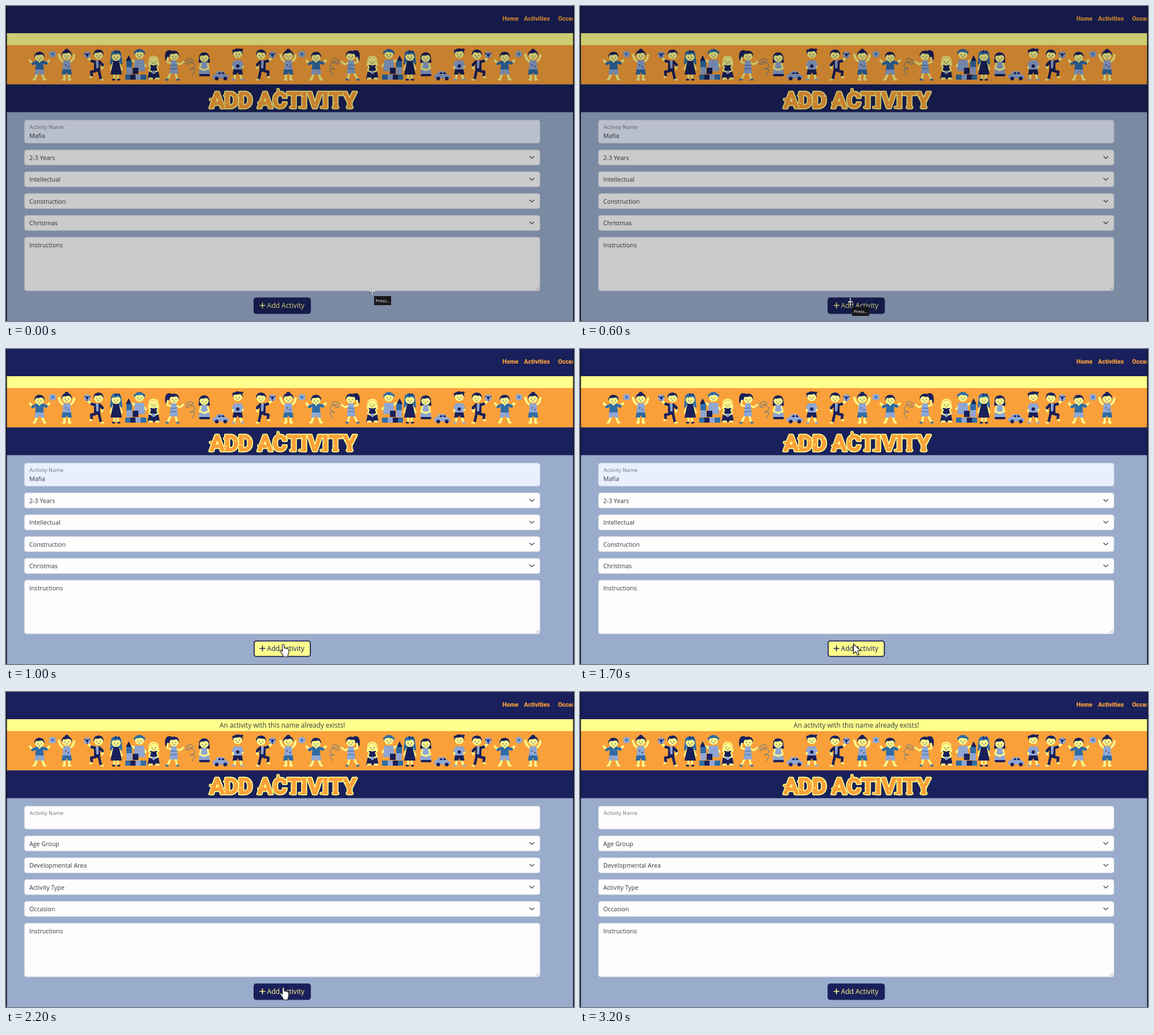
Animation of 1000 by 556 pixels, one loop 3500 ms. Source, as an HTML page:

```html
<!DOCTYPE html>
<html lang="en">
<head>
<meta charset="utf-8">
<title>Add Activity</title>
<style>
  html, body { margin: 0; width: 100%; height: 100%; overflow: hidden; background: #9aaccb; }
  svg { display: block; width: 100%; height: 100%; }
  text { font-family: "Open Sans", "Noto Sans", sans-serif; font-size: 10.7px; fill: #343a40; }
  .nav text { font: 800 10.6px Roboto, sans-serif; fill: #f9a03a; }
  .title text { font: 700 39px Roboto, sans-serif; fill: inherit; stroke-linejoin: round; }
  .field { fill: #fefdfe; stroke: #d3d9e4; stroke-width: .8; }
  .line { fill: none; stroke-linecap: round; stroke-linejoin: round; }
  #button text { font-size: 12.1px; }
</style>
</head>
<body>
<svg viewBox="0 0 1000 556" preserveAspectRatio="none">
  <rect width="1000" height="556" fill="#9aaccb"/>
  <rect width="1000" height="48" fill="#1a205b"/>
  <g class="nav">
    <text x="874" y="26">Home</text>
    <text x="912" y="26">Activities</text>
    <text x="972" y="26">Occasions</text>
  </g>
  <rect y="48" width="1000" height="21" fill="#ffff8d"/>
  <text id="message" x="486.5" y="63" text-anchor="middle" style="font-size:11.8px">An activity with this name already exists!</text>
  <g id="banner"><rect y="69" width="1000" height="69.500" fill="#f9a03a"/></g>
  <g id="page">
    <rect y="138.400" width="1000" height="49" fill="#1a205b"/>
    <g class="title" id="title"></g>
    <g id="form"></g>
    <g id="button">
      <rect x="436.8" y="515.3" width="99" height="27.4" rx="4" stroke="#1a205b" stroke-width="1.8"/>
      <path class="line" d="M451.500 524v9M447 528.500h9" stroke-width="1.6"/>
      <text x="459.500" y="532.700">Add Activity</text>
    </g>
  </g>
  <path d="M0 0h1.600v556H0zM998.400 0h1.600v556h-1.600z" fill="#101226"/>
  <rect id="dim" width="1000" height="556" opacity=".2"/>
  <g id="snip">
    <path d="M0-7V7M-4 0H4" stroke="#fff" stroke-width="1.400"/>
    <path d="M-1.200-7V7M1.200-7V7" stroke="#333" stroke-width=".4"/>
    <rect x="3" y="9" width="30" height="16" fill="#18181c"/>
    <text x="6" y="20" style="font-size:7.5px;fill:#fff">Press…</text>
  </g>
  <path id="arrow" d="M481.500 520.500v17l4-3.600 3 6.400 3-1.400-3-6.200h5.500z" fill="#fff" stroke="#111" stroke-width="1.100" stroke-linejoin="round"/>
  <path id="hand" d="M486.600 534v-11q0-1.800 1.600-1.800t1.700 1.800v5q3-1 3.300.6 2.200-.6 2.500.8 2-.3 2.100 1.600v4q0 3-1.500 5v3.300h-8.500v-2.800q-2.800-3-5.300-7.500-.4-2 1.500-1.800z" fill="#fff" stroke="#111" stroke-width="1.100" stroke-linejoin="round"/>
</svg>
<script>
const SKIN = '#fbf88c', NAVY = '#1a205b', BLUE = '#2f6ca6', PALE = '#8fa6d3', ORANGE = '#f9a03a';
const $ = id => document.getElementById(id);
const line = (d, color, width) => `<path class="line" d="${d}" stroke="${color}" stroke-width="${width}"/>`;
const shape = (d, color) => `<path d="${d}" fill="${color}"/>`;
const dot = (x, y, r, color) => `<circle cx="${x}" cy="${y}" r="${r}" fill="${color}"/>`;
const box = (x, y, w, h, color) => `<rect x="${x}" y="${y}" width="${w}" height="${h}" fill="${color}"/>`;

// Characters are drawn around x = 0 with their feet at y = 131.
const head = (x, y, hair) =>
  dot(x, y, 8, SKIN) +
  shape(`M${x - 8.600} ${y + 2}c-3-15 20-15 17.200 0q-1.500-6-5-6.500-7 2-9.200 .5-2 2-3 6z`, hair) +
  dot(x - 3, y + 1.500, .8, NAVY) + dot(x + 3, y + 1.500, .8, NAVY) +
  line(`M${x - 1.500} ${y + 4.500}q1.500 1.500 3 0`, NAVY, .7);

const body = (top, shorts, legs) =>
  line(legs, SKIN, 4) +
  shape('M-6 96h12l1.500 17h-15z', top) +
  shape('M-7.500 112h15l1.500 9h-7l-2-4-2 4h-7z', shorts);

const feet = (a, b, color) =>
  line(`M${a} 130h-3M${b} 130h3`, color, 2.800);

const ball = (x, y) => dot(x, y, 6, PALE) + dot(x, y, 2.300, NAVY) +
  line(`M${x - 5} ${y - 2}h2M${x + 3} ${y - 2}h2M${x} ${y + 3}v2`, NAVY, 1.400);

const cast = {
  jumper: () => line('M-5 100L-12 102-17 96M5 100L12 101 17 96', SKIN, 4) +
    line('M-5 99L-12 102M5 99L12 101', BLUE, 5) +
    body(BLUE, PALE, 'M-4 118L-8 129M4 118L8 129') + feet(-8, 8, SKIN) +
    shape('M-3 96h6l-3 5z', SKIN) + head(0, 90, NAVY),
  cheer: () => dot(0, 79, 3.600, NAVY) +
    line('M-5 99L-11 94-14 86M5 99L11 94 13 87', SKIN, 4) +
    body(PALE, BLUE, 'M-4 118V130M4 118V130') + feet(-4, 4, SKIN) +
    dot(-2, 104, 1, NAVY) + dot(3, 107, 1, NAVY) + head(0, 87, NAVY),
  kicker: () => line('M-4 100L-11 96-15 92M5 100L11 104 9 110', SKIN, 4) +
    line('M-3 99L-9 97M5 99L10 104', NAVY, 5) +
    line('M-3 115L-10 116-9 123M4 116L7 129', NAVY, 4.500) +
    line('M-9 125l-3 1M7 130h4', SKIN, 3) + shape('M-5 96h10l1 20h-11z', NAVY) +
    shape('M-2 96h5v14h-4z', PALE) + head(3, 86, NAVY) + ball(-17, 86),
  lady: () => shape('M-9 85c0-9 18-9 18 0l2 18h-22z', BLUE) +
    line('M-5 100L-10 112M5 100L10 112', SKIN, 3.200) +
    line('M-3 119V129M3 119V129', SKIN, 3.600) + feet(-3, 3, NAVY) +
    shape('M-5 97h10l5 24h-20z', NAVY) + head(0, 89, BLUE) +
    shape('M2 81l4-3v5zM2 81l-4-3v5z', NAVY),
  builder: () => line('M-5 99L-15 96M5 99L11 106', SKIN, 4) +
    shape('M-8 95h16l2 20h-20z', PALE) + head(0, 85, BLUE) +
    line('M-9 82q9-6 18 0', BLUE, 3) +
    shape('M-24 97l5-10 5 10z', NAVY) + box(-23, 97, 10, 11, BLUE) +
    box(-23, 108, 10, 12, PALE) + box(-12, 109, 10, 11, NAVY) +
    box(-25, 121, 9, 9, BLUE) + box(-16, 121, 9, 9, NAVY) +
    box(-7, 121, 9, 9, PALE) + box(2, 121, 10, 9, BLUE),
  blonde: () => shape('M-9 96c0-11 18-11 18 0l1 10h-20z', SKIN) +
    shape('M-6 104h12l5 25h-22z', NAVY) +
    line('M-6 107L-8 114-1 117M6 107L8 114 1 117', SKIN, 2.600) +
    line('M-8 128H-3M4 128H9', SKIN, 3.500) + dot(0, 117, 3, PALE) + head(0, 97, SKIN) +
    line('M-8 98q0-7 8-8 8 1 8 8', ORANGE, .8),
  reader: () => shape('M-9 91c0-11 18-11 18 0l1 9h-20z', NAVY) +
    shape('M-6 99h12l4 22h-20z', PALE) +
    line('M-6 102L-8 110 0 113 8 110 6 102', SKIN, 3) +
    line('M-7 122H8', NAVY, 4) + head(0, 91, NAVY),
  skipper: () => shape('M-2 79c-10-4-14 4-11 18 2-5 5-7 10-8z', NAVY) +
    line('M-3 101L-10 99-9 91M5 100L12 103 19 98', SKIN, 3.200) +
    line('M-3 116L-9 128M4 116L7 129', SKIN, 3.600) + feet(-9, 7, BLUE) +
    shape('M-3 96h9l3 23h-15z', PALE) + line('M-5 111L7 110M-4 105L7 104', BLUE, 1) +
    head(2, 88, NAVY) +
    line('M20 98C35 86 40 98 28 102S26 92 36 101 22 113 33 111s2 8 1 11', BLUE, .9),
  walker: () => line('M-5 99L-9 109-2 110M5 99L9 107 3 109', SKIN, 3.600) +
    body(PALE, NAVY, 'M-4 119L-6 129M4 119L7 129') + feet(-6, 7, PALE) +
    line('M-5 98L-8 104M5 98L8 104', PALE, 4.500) + dot(0, 106, 3, NAVY) +
    head(0, 84, NAVY) + line('M-8 79L8 77', NAVY, 3.500),
  car: () => shape('M-14 128v-6l5-2 3-5h11l4 6 5 2v5z', PALE) +
    shape('M-5 120l2-3h3v3zM2 120v-3h3l2 3z', NAVY) +
    dot(-7, 128, 3.300, NAVY) + dot(8, 128, 3.300, NAVY),
  star: () => dot(0, 85, 5.500, PALE) +
    line('M0 80v10M-5 82L5 88M5 82L-5 88', PALE, 2.600) + dot(0, 85, 2, BLUE)
};

// A trailing "<" mirrors the character.
const parade = `jumper 59,star 82,cheer 107,kicker 160,lady 194,builder 235,blonde 260,skipper 294,
  reader 349,car 378,walker 408,kicker< 452,cheer 497,star 521,jumper 546,skipper< 609,blonde 645,
  builder< 674,lady 711,reader 739,car 768,walker 798,kicker< 832,jumper 878,star 903,cheer 928`;
$('banner').innerHTML += parade.split(',').map(entry => {
  const [name, x] = entry.trim().split(' ');
  const flip = name.endsWith('<') ? -1 : 1;
  return `<g transform="translate(${x}) scale(${flip} 1)">${cast[name.replace('<', '')]()}</g>`;
}).join('');

const letters = (color, width) => `<g fill="${color}" stroke="${color}" stroke-width="${width}">
  <text x="358.500" y="180" letter-spacing="-.7">ADD</text><text x="443" y="180" letter-spacing=".4">ACTIVITY</text></g>`;
const serifs = 'M360 165h5M388 158h-3M388 173h-3M413 158h-3M413 173h-3M445 171h5M479 147.500v5' +
  'M517 154h10M517 179h10M555 154h10M555 179h10M501 179h8M576 179h8M601 179h8';
$('title').innerHTML =
  letters('#ffff8d', 5) + line(serifs, '#ffff8d', 6) +
  letters(ORANGE, 1.500) + line(serifs, ORANGE, 3) +
  [366, 375, 388, 404, 414, 430, 451, 460, 474, 503, 522, 535, 544, 559, 578, 598, 609]
    .map((x, i) => dot(x, 158 + i * 7 % 17, 1.100, '#ffff8d')).join('');

const fields = [['2-3 Years', 'Age Group'], ['Intellectual', 'Developmental Area'],
  ['Construction', 'Activity Type'], ['Christmas', 'Occasion']];
const field = (y, h, id = '') =>
  `<rect class="field" ${id} x="32.500" y="${y}" width="907.500" height="${h}" rx="4"/>`;
$('form').innerHTML =
  field(201.500, 40.500, 'id="nameBox"') +
  '<text x="41.500" y="217.300" style="font-size:9.4px;fill:#6c757d">Activity Name</text>' +
  '<text id="name" x="41" y="232.800">Mafia</text>' +
  fields.map((_, i) => {
    const y = 254 + i * 38.500;
    return field(y, 26.800) + `<text class="choice" x="41" y="${y + 17.500}"></text>` +
      line(`M922 ${y + 11.500}l3.700 3.700 3.700-3.700`, '#343a40', 1.200);
  }).join('') +
  field(408, 94.800) + '<text x="41" y="425.500">Instructions</text>' +
  line('M933 501l5-5M936.500 501l2-2', '#777', .7);

const show = (id, on) => $(id).setAttribute('visibility', on ? 'visible' : 'hidden');
const LOOP = 3500, STEP = 100;
const BRIGHT = 800, CLICKED = 1600, RELOADED = 1800, BANNER_BACK = 1900, CURSOR_GONE = 2700;

// Pointer path while the screen is dimmed: [time, x, y].
const path = [[0, 645, 503], [100, 618, 506], [200, 618, 506], [600, 476, 522], [900, 476, 522]];
function pointAt(t) {
  const i = path.findIndex(p => p[0] > t);
  const a = path[i - 1], b = path[i], k = (t - a[0]) / (b[0] - a[0]);
  return [a[1] + (b[1] - a[1]) * k, a[2] + (b[2] - a[2]) * k];
}

function draw(t) {
  const dim = t < BRIGHT, reloaded = t >= RELOADED;
  const banner = !reloaded || t >= BANNER_BACK;
  const arrow = t >= CLICKED && !reloaded;
  const hover = !dim && !reloaded;
  show('dim', dim);
  show('snip', dim);
  show('message', reloaded);
  show('name', !reloaded);
  show('banner', banner);
  show('arrow', arrow);
  show('hand', !dim && !arrow && t < CURSOR_GONE);
  if (dim) $('snip').setAttribute('transform', `translate(${pointAt(t)})`);
  $('page').setAttribute('transform', `translate(0 ${banner ? 0 : -69})`);
  $('nameBox').style.fill = reloaded ? '#fefdfe' : '#e8f0fe';
  document.querySelectorAll('.choice').forEach((el, i) => el.textContent = fields[i][+reloaded]);
  const [rect, plus, label] = $('button').children;
  rect.style.fill = hover ? '#ffff8d' : NAVY;
  plus.style.stroke = label.style.fill = hover ? NAVY : '#ffff8d';
}

const start = performance.now();
function tick() {
  const t = (performance.now() - start) % LOOP;
  draw(Math.floor(t / STEP) * STEP);
  requestAnimationFrame(tick);
}
tick();
</script>
</body>
</html>
```
